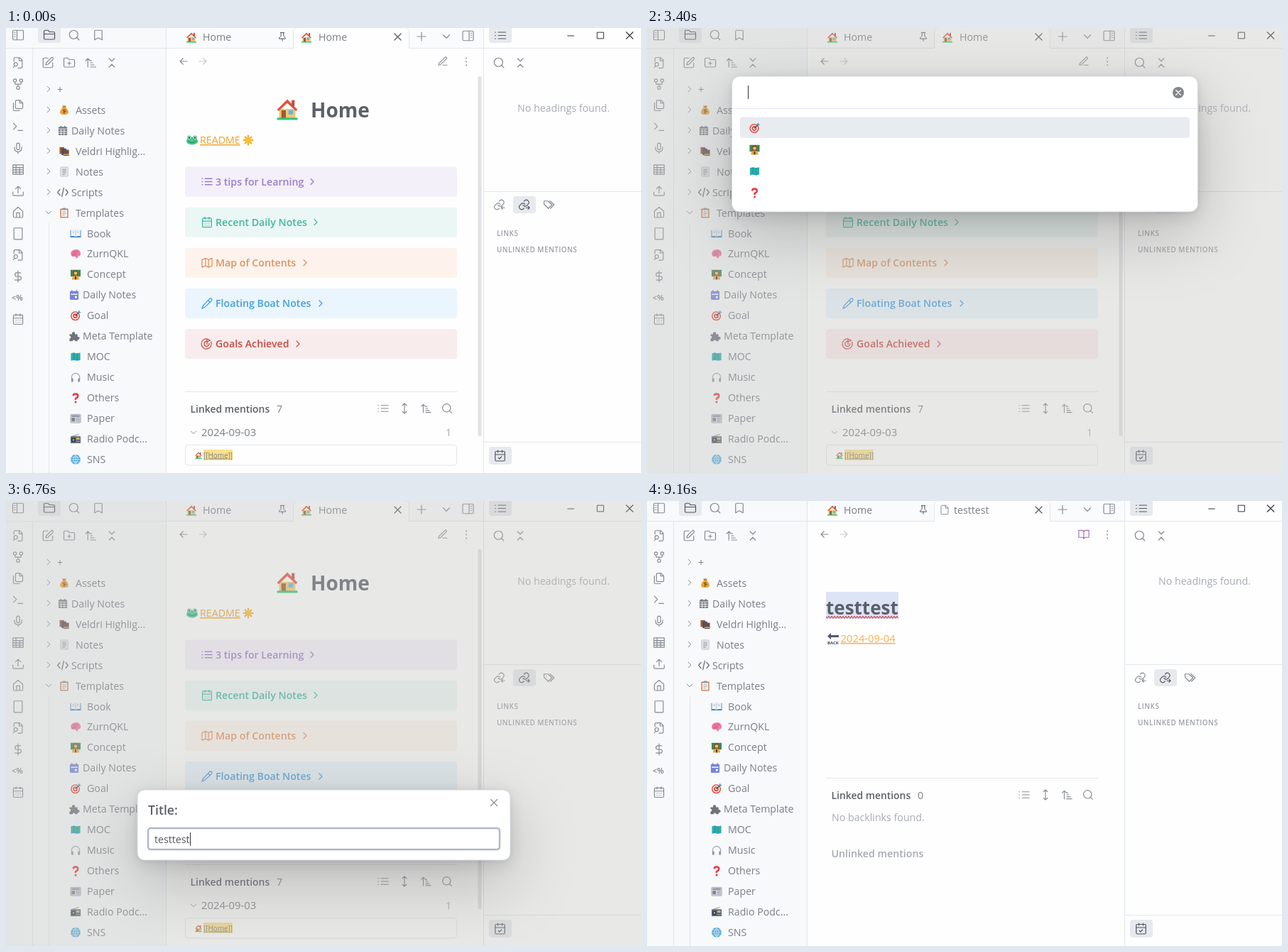
An HTML page for the animation above (9230 ms loop, 894x627 px).

```html
<!DOCTYPE html>
<html lang="en">
<head>
<meta charset="utf-8">
<title>Notes</title>
<style>
html, body { margin: 0; width: 100%; height: 100%; overflow: hidden; background: #fefefe; }
svg { display: block; }
text { font: 14.2px "Open Sans", "Noto Sans", sans-serif; fill: #7a7e86; white-space: pre; }
.semi { font-weight: 600; }
.strong { fill: #5c6068; font-weight: 600; }
.faint { fill: #a6aab1; }
.small { font-size: 9.9px; font-weight: 600; letter-spacing: .5px; fill: #9a9ea6; }
.date { font-size: 14.8px; }
.link { fill: #eda125; text-decoration: underline; }
.h1 { font-weight: 700; fill: #5c6068; }
.line { stroke: #e2e6eb; fill: none; }
.icon { fill: none; stroke-linecap: round; stroke-linejoin: round; }
.card { fill: #fff; stroke: #d4d8dd; }
.modal .card {
  filter: drop-shadow(0 1.8px 3.6px rgba(0,0,0,.07)) drop-shadow(0 6.3px 12.3px rgba(0,0,0,.11)) drop-shadow(0 30px 45px rgba(0,0,0,.2));
}
</style>
</head>
<body>
<svg id="stage" width="894" height="627" viewBox="0 0 894 627"></svg>
<script>
const LOOP = 9230;
const GREY = '#858a92', DARK = '#50545c';

// Line icons on a 24 unit grid
const folder = 'M4 20h16a2 2 0 0 0 2-2V8a2 2 0 0 0-2-2h-8l-2-3H4a2 2 0 0 0-2 2v13a2 2 0 0 0 2 2z';
const calendar = 'M5 4h14a2 2 0 0 1 2 2v14a2 2 0 0 1-2 2H5a2 2 0 0 1-2-2V6a2 2 0 0 1 2-2zM16 2v4M8 2v4M3 10h18';
const panel = 'M4 3h16a2 2 0 0 1 2 2v14a2 2 0 0 1-2 2H4a2 2 0 0 1-2-2V5a2 2 0 0 1 2-2z';
const chain = 'M9 13a5 5 0 0 0 7.500.5l3-3a5 5 0 0 0-7-7L11 5M13 11a5 5 0 0 0-7.500-.5l-3 3a5 5 0 0 0 7 7L11 19';
const ICONS = {
  panelL: panel + 'M10 3v18M5 7h2M5 11h2M5 15h2',
  panelR: panel + 'M14 3v18M17 7h2M17 11h2M17 15h2',
  folder: folder + 'M2 10h20',
  folderPlus: folder + 'M12 10v6M9 13h6',
  search: 'M19 11a8 8 0 1 1-16 0a8 8 0 1 1 16 0M21 21l-4.3-4.3',
  bookmark: 'M19 21l-7-4-7 4V5a2 2 0 0 1 2-2h10a2 2 0 0 1 2 2z',
  edit: 'M12 3H5a2 2 0 0 0-2 2v14a2 2 0 0 0 2 2h14a2 2 0 0 0 2-2v-7M18.4 2.6a2.1 2.1 0 0 1 3 3L12 15l-4 1 1-4z',
  sort: 'M3 8l4-4 4 4M7 4v16M12 12h4M12 16h7M12 20h10M12 8h2',
  fold: 'M7 20l5-5 5 5M7 4l5 5 5-5',
  fileSearch: 'M4 9V4a2 2 0 0 1 2-2h9l5 5v13a2 2 0 0 1-2 2h-6M14 2v6h6M11 15a3.5 3.5 0 1 1-7 0a3.5 3.5 0 1 1 7 0M3 21l2.4-3',
  fork: 'M15 19a3 3 0 1 1-6 0a3 3 0 1 1 6 0M9 5a3 3 0 1 1-6 0a3 3 0 1 1 6 0M21 5a3 3 0 1 1-6 0a3 3 0 1 1 6 0M18 8v3a1 1 0 0 1-1 1H7a1 1 0 0 1-1-1V8M12 12v4',
  copy: 'M15 2v5h5M9 18a2 2 0 0 1-2-2V4a2 2 0 0 1 2-2h7l5 5v9a2 2 0 0 1-2 2zM3 7v13a2 2 0 0 0 2 2h10',
  terminal: 'M3 17l6-6-6-6M12 19h9',
  mic: 'M12 2a3 3 0 0 0-3 3v7a3 3 0 0 0 6 0V5a3 3 0 0 0-3-3M19 10v2a7 7 0 0 1-14 0v-2M12 19v3',
  table: 'M2 3h20v18H2zM2 8h20M2 12.500h20M2 17h20M8 3v18M15 8v13',
  upload: 'M2 14v5a2 2 0 0 0 2 2h16a2 2 0 0 0 2-2v-5M12 16V3M7 8l5-5 5 5',
  home: 'M3 10l9-8 9 8v10a2 2 0 0 1-2 2H5a2 2 0 0 1-2-2zM9 22v-9h6v9',
  tablet: 'M5 1h14a1 1 0 0 1 1 1v20a1 1 0 0 1-1 1H5a1 1 0 0 1-1-1V2a1 1 0 0 1 1-1z',
  dollar: 'M12 1v22M17 5H9.500a3.500 3.500 0 0 0 0 7h5a3.500 3.500 0 0 1 0 7H6',
  cal: calendar + 'M8 14h.1M12 14h.1M16 14h.1M8 18h.1M12 18h.1M16 18h.1',
  calCheck: calendar + 'M9 16l2 2 4-4',
  pin: 'M12 17v5M8 3h8M9 3v8l-4 4v2h14v-2l-4-4V3',
  x: 'M6 6l12 12M18 6L6 18', plus: 'M4 12h16M12 4v16', minus: 'M5 12h14', square: 'M5 5h14v14H5z',
  down: 'M6 9l6 6 6-6', right: 'M9 6l6 6-6 6',
  back: 'M19 12H5M11 6l-6 6 6 6', next: 'M5 12h14M13 6l6 6-6 6',
  list: 'M8 6h14M8 12h14M8 18h14M2 6h1M2 12h1M2 18h1',
  pencil: 'M17 3a2.800 2.800 0 1 1 4 4L7 20l-5 2 2-5zM14 6l4 4',
  write: 'M16.500 3.500a2.100 2.100 0 0 1 3 3L7 19l-4 1 1-4zM12 20h9',
  dots: 'M12 4v1M12 12v1M12 20v1',
  linkIn: chain + 'M22 18h-7M18 15l-3 3 3 3', linkOut: chain + 'M15 18h7M19 15l3 3-3 3',
  tags: 'M2 5v6l8 8 7-7-8-7zM13 5l8 7-7 7M6 9h.1',
  updown: 'M12 2v20M8 6l4-4 4 4M8 18l4 4 4-4',
  map: 'M2 6l7-3 6 3 7-3v15l-7 3-6-3-7 3zM9 3v15M15 6v15',
  goal: 'M20 8a10 10 0 1 1-8-6M16 11a5 5 0 1 1-4-4M12 13V2l6 3-6 3',
  book: 'M2 4h6a4 4 0 0 1 4 4v13a3 3 0 0 0-3-3H2zM22 4h-6a4 4 0 0 0-4 4v13a3 3 0 0 1 3-3h7z',
  file: 'M14 2H6a2 2 0 0 0-2 2v16a2 2 0 0 0 2 2h12a2 2 0 0 0 2-2V8zM14 2v6h6',
  code: 'M6 6l-5 6 5 6M18 6l5 6-5 6M14 3l-4 18'
};

const icon = (name, x, y, size = 18, color = GREY, w = 1.6) =>
  `<path class="icon" transform="translate(${x - size / 2} ${y - size / 2}) scale(${size / 24})" stroke="${color}" stroke-width="${w}" d="${ICONS[name]}"/>`;
const rect = (x, y, w, h, fill, r = 0, more = '') =>
  `<rect x="${x}" y="${y}" width="${w}" height="${h}" rx="${r}" fill="${fill}" ${more}/>`;
const text = (x, y, s, cls = '', more = '') => `<text x="${x}" y="${y}" class="${cls}" ${more}>${s}</text>`;
const line = d => `<path class="line" d="${d}"/>`;
const path = (d, fill, stroke = 'none', w = 1) => `<path d="${d}" fill="${fill}" stroke="${stroke}" stroke-width="${w}"/>`;
const dot = (x, y, r, fill, more = '') => `<circle cx="${x}" cy="${y}" r="${r}" fill="${fill}" ${more}/>`;
const group = (id, body, cls = '') => `<g id="${id}" class="${cls}">${body}</g>`;

// Colour pictograms on a 16 unit grid
const PICS = {
  house: path('M2.500 8h11v6.500h-11z', '#f6c66b') + path('M1 8.500L8 1.500l7 7-1.200 1L8 4 2.200 9.500z', '#e0533f') + rect(11, 2, 2, 4, '#b5533f') +
    rect(4, 9, 3, 5.500, '#9a5b35') + rect(8.800, 8.800, 3.200, 3, '#62b7e8') + rect(1, 14, 14, 1.500, '#2fc477'),
  frog: path('M0 9.500a8 5 0 0 0 16 0a8 5.500 0 0 0-16 0', '#45c78c') + dot(4, 4.500, 3, '#45c78c') + dot(12, 4.500, 3, '#45c78c') +
    dot(4, 4.500, 2, '#fff') + dot(12, 4.500, 2, '#fff') + dot(4, 4.500, 1.200, '#234') + dot(12, 4.500, 1.200, '#234') + path('M2 9.500q6 4 12 0', 'none', '#1c7d54'),
  sun: path('M8 0v16M0 8h16M2.500 2.500l11 11M13.500 2.500l-11 11', 'none', '#f5a623', 2.2) + dot(8, 8, 4.700, '#fbbd35'),
  bag: path('M6 3h4l1 2c3 3 4 6 3 8q-1 2-6 2t-6-2c-1-2 0-5 3-8z', '#e9a63c') + path('M5 1.500h6L10 4H6z', '#c27b2b') + path('M10 8q-4-1.500-4 .5t4 1.500-4 2M8 7v7', 'none', '#81501d'),
  day: rect(1.500, 2.500, 13, 12.500, '#767b84', 1.5) + path('M5 1v3M11 1v3', 'none', '#767b84', 1.6) + path('M2 5.500h12M5.500 6v9M10 6v9M2 9h12M2 12h12', 'none', '#fff', .9),
  books: rect(1, 2, 7, 10, '#a9572f') + rect(4, 4, 7, 10, '#3d5368') + rect(7, 6, 8, 9, '#6b4b45') + path('M7 13h8', 'none', '#e9c46a', 1.3),
  note: rect(2.500, 1, 11, 14, '#e5e8ec', 1, 'stroke="#b1b7bf" stroke-width=".8"') + path('M5 4.500h6M5 7h6M5 9.500h6M5 12h4', 'none', '#878e98'),
  clip: rect(2, 1.500, 12, 14, '#d37b3f', 1) + rect(3.500, 3.500, 9, 10.500, '#f4f6f8') + rect(5.500, .5, 5, 3, '#8d959f', 1) + path('M5 6.500h6M5 9h6M5 11.500h4', 'none', '#9aa5b2'),
  book: path('M0 3h16v11H0z', '#3a87c5') + path('M1 2.500q4-1 7 1 3-2 7-1V12q-4-1-7 1-3-2-7-1z', '#f3f6f9') + path('M8 3.500V13M3 5h3M3 7h3M10 5h3M10 7h3', 'none', '#a6b2bf', .8),
  brain: path('M1 9C0 5 3 2 7 1.500 12 0 16 4 15.500 8q0 3-4 3.500 0 3-2 3-1-2-2.500-3Q2 13 1 9z', '#ee7ba0') + path('M4 5q3-1 3 2t3 1M9 3q0 2 3 2M3 9q3-1 4 1', 'none', '#c94674', .9),
  teacher: rect(.5, 1, 15, 10, '#3f8757', .5) + path('M4.500 10V5a3.500 3.500 0 0 1 7 0v5z', '#7a4b2b') + dot(8, 6, 2.500, '#f4c34e') +
    path('M2.500 15.500q0-6 5.500-6t5.500 6z', '#e9a53a') + rect(7, 10.500, 2, 5, '#463a3a'),
  blue: rect(1.500, 2, 13, 13, '#7685d8', 1.5) + path('M4.500 .5v3M11.500 .5v3', 'none', '#7685d8', 1.6) + rect(3, 6, 10, 1.5, '#fff') + rect(9, 9.500, 3, 3, '#fff'),
  target: dot(7.500, 8.500, 7, '#e14d3f') + dot(7.500, 8.500, 5.300, '#fff') + dot(7.500, 8.500, 3.700, '#e14d3f') + dot(7.500, 8.500, 1.700, '#fff') +
    path('M7.500 8.500L13 3', 'none', '#34495e', 1.3) + path('M12 1l0 3 3 0 1-1.500-2-.5-.5-2z', '#3b9bd8'),
  puzzle: path('M1 5h4a2.300 2.300 0 1 1 4 0h4v4a2.200 2.200 0 1 1 0 4v2.500H9.500a2 2 0 1 0-4 0H1v-4a2 2 0 1 0 0-4z', '#6f747d'),
  map: path('M1 3l4-1 5 1 5-1v11l-5 1-5-1-4 1z', '#27a9bf') + path('M2 5l3-1 1 3-2 4-2-3zM9 5l5-1v4l-3 3-2-3z', '#39b878') + path('M5.500 2v11M10.500 3v11', 'none', '#1782a0', .7),
  phones: path('M2 11V8a6 6 0 0 1 12 0v3', 'none', '#a9afb8', 1.4) + rect(1.500, 9.500, 3, 5.500, '#8f969f', 1.3) + rect(11.500, 9.500, 3, 5.500, '#8f969f', 1.3),
  ask: path('M4.500 5Q4.500 2 8 2t3.500 3q0 2-2 3T8 11', 'none', '#e63a40', 2.7) + dot(8, 14.200, 1.600, '#e63a40'),
  paper: rect(.5, 2, 15, 12.500, '#d9dde2', 1, 'stroke="#8c929b" stroke-width=".8"') + rect(2, 3.500, 12, 2, '#7b828c') + rect(2, 7, 5, 5.500, '#7b828c') + path('M8.500 7.500H14M8.500 9.700H14M8.500 12H14', 'none', '#8c929b'),
  radio: rect(.5, 4, 15, 10.500, '#5d6974', 1) + path('M3 4l10-3', 'none', '#7e8994') + dot(4.800, 9.500, 3, '#2d3943') + dot(4.800, 9.500, 1.400, '#a0abb5') + rect(9, 6, 5, 3, '#e0b35b') + dot(10.500, 11.800, 1, '#58b8d8') + dot(13, 11.800, 1, '#58b8d8'),
  globe: dot(8, 8, 7.300, '#4da5da') + path('M8 1v14M1 8h14M2 4.500h12M2 11.500h12M8 1q-7 7 0 14M8 1q7 7 0 14', 'none', '#dff1fb', .8),
  web: path('M8 0v16M0 8h16M2.300 2.300l11.400 11.400M13.700 2.300L2.300 13.700', 'none', '#777d86', .9) + dot(8, 8, 5.800, 'none', 'stroke="#777d86"') + dot(8, 8, 2.800, 'none', 'stroke="#777d86"'),
  back: path('M0 4.500L5 0v3h11v3H5v3z', '#565870') + `<text x="0" y="15.500" style="font-size:6px;font-weight:700;fill:#45475c">BACK</text>`
};
const pic = (name, x, y, size = 16) => `<g transform="translate(${x - size / 2} ${y - size / 2}) scale(${size / 16})">${PICS[name]}</g>`;

function frame() {
  const ribbon = ['fileSearch', 'fork', 'copy', 'terminal', 'mic', 'table', 'upload', 'home', 'tablet', 'fileSearch', 'dollar', '', 'cal'];
  const active = (x, y, w, h) => rect(x, y, w, h, '#e6e9ee', 4);
  return rect(0, 0, 894, 627, '#fefefe') + rect(0, 0, 225, 627, '#f7f9fb') + rect(225, 0, 447, 28, '#fafbfc') +
    line('M0 28.500H404.500V6q0-6 6-6H561.500q6 0 6 6V28.500H894M37.500 28V627M225.500 0V627M672.500 0V627M672 230.500H894M672 583.500H894') +
    path('M405 29V6q0-6 6-6h150q6 0 6 6v23z', '#fefefe') +
    active(45, -4, 32, 25) + active(680, -4, 32, 25) + active(714, 237, 32, 24) + active(680, 590, 32, 25) +
    icon('panelL', 17, 10) + icon('folder', 61, 10, 18, DARK) + icon('search', 96, 10) + icon('bookmark', 130, 10) +
    ['edit', 'folderPlus', 'sort', 'fold'].map((n, i) => icon(n, 59 + i * 30, 49)).join('') +
    ribbon.map((n, i) => n ? icon(n, 17, 49 + i * 30.1, 17.5) : text(8, 384, '&lt;%', 'semi', 'style="font-size:11px"')).join('') +
    pic('house', 261, 13) + text(277, 18, 'Home') + icon('pin', 389, 12, 15, DARK) +
    icon('x', 551.5, 12.5, 18, DARK) + icon('plus', 585, 12) + icon('down', 620, 12) + icon('panelR', 650.5, 11) +
    icon('list', 696, 10.5, 18, DARK) + icon('minus', 795, 11, 15, '#333') + icon('square', 837, 10.5, 15, '#333') + icon('x', 878, 10.5, 19, '#333', 1.4) +
    icon('back', 250, 47, 17) + icon('next', 277, 47, 17, '#c3c7cd') + icon('dots', 648, 47, 15, GREY, 2.6) +
    icon('search', 694, 49) + icon('fold', 724, 49) + text(720, 117.5, 'No headings found.', 'faint') +
    icon('linkIn', 695, 249, 17) + icon('linkOut', 730, 249, 17, DARK) + icon('tags', 765, 249) +
    text(691, 293, 'LINKS', 'small') + text(691, 315.5, 'UNLINKED MENTIONS', 'small') + icon('calCheck', 695.5, 602.5, 18, DARK);
}

function tree() {
  const top = [['', '+'], ['bag', 'Assets'], ['day', 'Daily Notes', 1], ['books', 'Veldri Highlig...'], ['note', 'Notes'], ['code', 'Scripts', 1], ['clip', 'Templates']];
  const sub = [['book', 'Book'], ['brain', 'ZurnQKL'], ['teacher', 'Concept'], ['blue', 'Daily Notes', 1], ['target', 'Goal'], ['puzzle', 'Meta Template', 1],
    ['map', 'MOC'], ['phones', 'Music'], ['ask', 'Others'], ['paper', 'Paper'], ['radio', 'Radio Podc...'], ['globe', 'SNS']];
  const row = (x, y, [p, s, tight]) => {
    const mark = !p ? '' : p == 'code' ? icon(p, x - 2, y, 16, '#6f747d', 2) : pic(p, tight ? x - 2 : x, y, 15);
    return mark + text(p ? x + (tight ? 10 : 16) : x - 10, y + 5, s);
  };
  return line('M60.500 275V627') +
    top.map((r, i) => icon(i == 6 ? 'down' : 'right', 60, 86 + i * 29, 15) + row(82, 86.5 + i * 29, r)).join('') +
    sub.map((r, i) => row(98, 289.5 + i * 28.95, r)).join('');
}

const mentions = (y, n) => line(`M252 ${y - 25}.5H635`) + text(259.5, y + 5, 'Linked mentions', 'strong', 'style="font-size:13.9px"') + text(381, y + 5, n) +
  ['list', 'updown', 'sort', 'search'].map((s, i) => icon(s, 531 + i * 30, y - 1, 17)).join('');

function homePage() {
  const callouts = [
    ['list', '3 tips for Learning', '#f3f0f9', '#9c7cc8', 431],
    ['cal', 'Recent Daily Notes', '#ebf7f4', '#41b7a1', 436],
    ['map', 'Map of Contents', '#fdf3ec', '#de935f', 421],
    ['pencil', 'Floating Boat Notes', '#eaf5fd', '#429fde', 443],
    ['goal', 'Goals Achieved', '#f9ecec', '#c64a44', 411]];
  return pic('house', 423, 13) + text(440, 18, 'Home') + icon('write', 615, 47, 16) + rect(664.5, 68, 5, 507, '#dfe2e6', 2) +
    pic('house', 396, 114, 33) + text(429, 126, 'Home', 'h1', 'style="font-size:28px"') +
    pic('frog', 262, 158) + text(273, 163, 'README', 'link') + pic('sun', 341, 158, 14.5) +
    callouts.map(([ic, s, bg, fg, x], i) => {
      const y = 195.5 + i * 57.15;
      return rect(252, y, 383, 42.2, bg, 4) + icon(ic, 283, y + 21, 17, fg, 1.8) + text(295, y + 26, s, 'semi', `style="fill:${fg}"`) + icon('right', x, y + 21, 16, fg, 2);
    }).join('') +
    mentions(537, 7) + icon('down', 264, 570, 14) + text(275, 575, '2024-09-03', 'date') + text(619, 575, '1', 'faint') +
    rect(252.5, 587.5, 382, 28.5, '#fefefe', 4, 'stroke="#e2e6eb"') + pic('house', 271, 602, 11) +
    rect(278, 594, 41, 15, '#fde08a') + text(278, 605.5, '[[Home]]', '', 'style="font-size:9.9px;text-decoration:underline"');
}

function newPage() {
  let wave = 'M252 163';
  for (let x = 254; x <= 354; x += 2) wave += `L${x} ${x % 4 ? 165 : 162.5}`;
  return icon('file', 419, 12.5, 15) + text(432, 18, 'testtest') + icon('book', 615, 47, 17, '#a46fae') +
    rect(252, 128, 102, 38, '#dce4f6', 0, 'id="mark"') + text(252, 160, 'testtest', 'h1', 'style="font-size:26px"') +
    `<path id="wave" d="${wave}" fill="none" stroke="#d8454f" stroke-width="1.1"/>` +
    pic('back', 262, 194) + text(272.5, 199, '2024-09-04', 'link date', 'style="fill:#f4b04a"') +
    mentions(415, 0) + text(260, 451, 'No backlinks found.', 'faint') + text(259.5, 502, 'Unlinked mentions', 'semi faint');
}

const palette = (id, height, items) => group(id,
  `<rect class="card" x="119.5" y="68" width="656" height="${height}" rx="11"/>` + line('M120 113.500H775') +
  rect(131, 125.5, 633, 29.5, '#e8ebf0', 4, 'class="pick"') + rect(142, 81, 1, 19, '#333', 0, 'class="caret"') +
  dot(748, 91, 8, '#83868b') + icon('x', 748, 91, 13, '#fff', 2.6) +
  items.map((p, i) => pic(p, 151.5, 141 + i * 30.4, 15)).join(''), 'modal');

const prompt = group('prompt',
  '<rect class="card" x="185" y="407" width="525" height="99" rx="10"/>' + icon('x', 687, 425, 18) +
  text(200, 441.5, 'Title:', 'strong', 'style="font-size:17.7px"') +
  rect(199.5, 460.5, 496, 31, '#fff', 4, 'stroke="#d4d8dd"') + rect(200, 461, 495, 30, 'none', 4, 'id="focus" stroke="#afb9c9" stroke-width="2.5"') +
  text(209, 482, '', '', 'id="typed" style="fill:#55585f"') + rect(209, 467, 1, 19, '#333', 0, 'class="caret"'), 'modal');

const stage = document.getElementById('stage');
stage.innerHTML = frame() + tree() + group('home', homePage()) + group('note', newPage()) +
  rect(0, 0, 894, 627, 'rgba(190,190,188,.36)', 0, 'id="dim"') +
  palette('kinds', 313, ['book', 'brain', 'phones', 'paper', 'radio', 'globe', 'web', 'ask']) +
  palette('topics', 191, ['target', 'teacher', 'map', 'ask']) + prompt;

const $ = s => stage.querySelector(s);
const show = (s, on) => { $(s).style.display = on ? '' : 'none'; };
const KEYS = [5540, 5670, 5870, 6070, 6350, 6440, 6540, 6760];

function draw(t) {
  const within = (a, b) => t >= a && t < b;
  show('#home', t < 7020);
  show('#note', t >= 7020);
  show('#mark', t >= 7090);
  show('#wave', t >= 7220);
  show('#dim', within(2130, 6890));
  show('#kinds', within(2130, 3400));
  show('#topics', within(3400, 4530));
  show('#prompt', within(4530, 6890));
  show('#kinds .caret', !within(2680, 3200));
  show('#topics .caret', !within(3930, 4460));
  show('#prompt .caret', !within(5070, 5540));
  $('#kinds .pick').setAttribute('y', t < 2940 ? 125.5 : 339);
  $('#topics .pick').setAttribute('y', t < 4000 ? 125.5 : 217);
  $('#focus').style.opacity = Math.min(1, Math.max(0, (t - 4460) / 210));
  const typed = $('#typed');
  typed.textContent = 'testtest'.slice(0, KEYS.filter(k => t >= k).length);
  $('#prompt .caret').setAttribute('x', 209 + Math.round(typed.getComputedTextLength()));
}

function tick() {
  draw(performance.now() % LOOP);
  requestAnimationFrame(tick);
}
tick();
</script>
</body>
</html>
```
